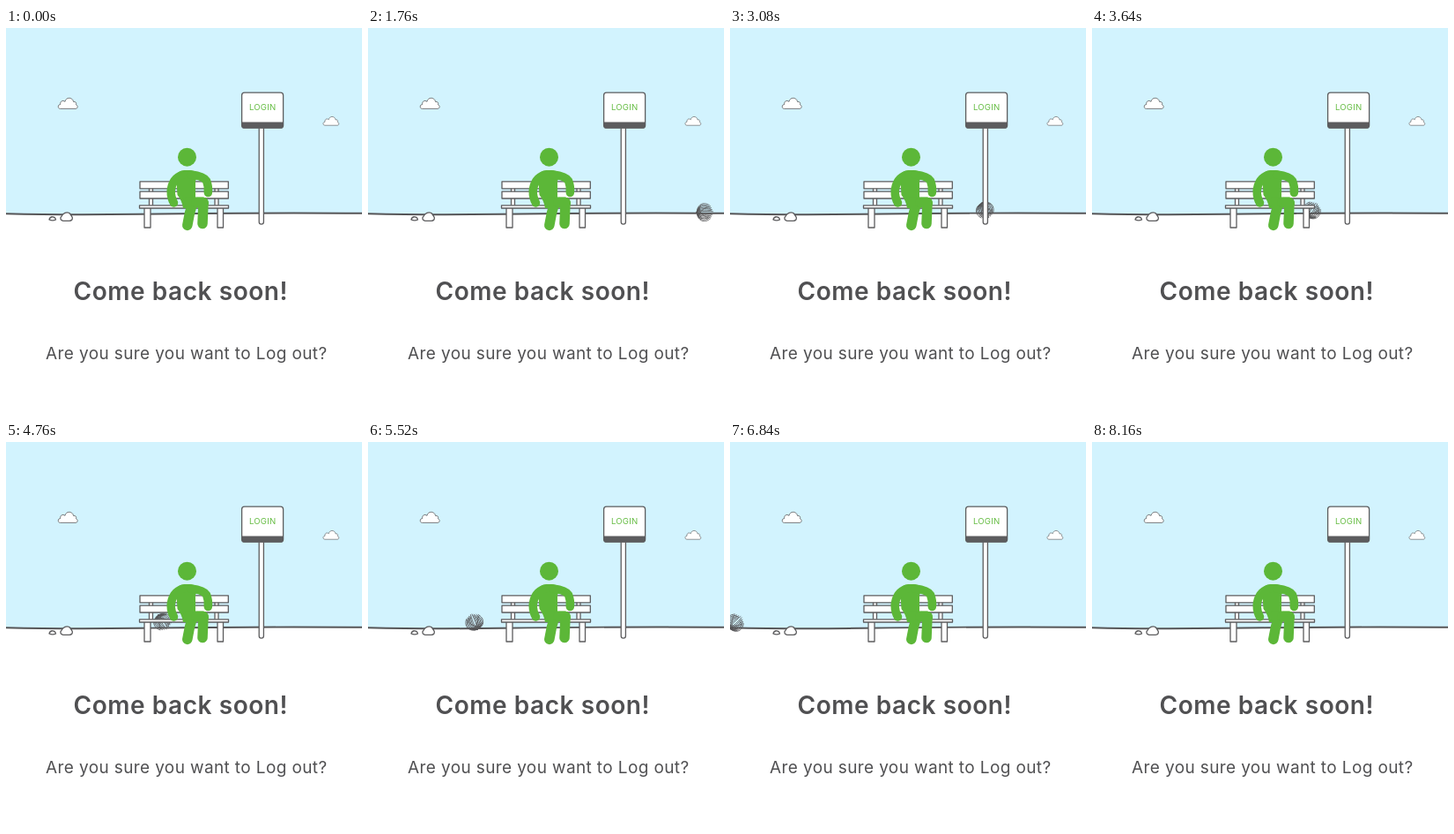
Write an HTML page that moves like this. It is 404x437 px and loops after 9000 ms.

```html
<!DOCTYPE html>
<html lang="en">
<head>
<meta charset="utf-8">
<title>Come back soon!</title>
<style>
  html, body { margin: 0; width: 100%; height: 100%; overflow: hidden; background: #fff; }
  svg { display: block; width: 404px; height: 437px; }
  text { font-family: Inter, sans-serif; text-anchor: middle; fill: #505052; letter-spacing: .02em; }
  .outline { fill: #fff; stroke: #5c5c5e; stroke-width: 1.3; stroke-linejoin: round; }
  .thin { stroke-width: .8; }
  .limb { fill: none; stroke: #5cb738; stroke-linecap: round; stroke-linejoin: round; }
  #weed { fill: none; stroke: #555557; stroke-width: .8; stroke-linecap: round; }
</style>
</head>
<body>
<svg viewBox="0 0 404 437">
  <path fill="#d2f3fe" d="M0 0H404V210L290 209 100 211 0 210.5Z"/>
  <path fill="none" stroke="#555557" stroke-width="1.9" d="M0 210.2C50 211.5 100 211.5 150 210.8S300 208.8 404 209.8"/>

  <g class="outline thin">
    <path id="cloud" d="M61.5 91.4C58.5 91.4 58.4 86.6 61.8 86.4C61 83 64.6 81.2 67 83.4C67.6 78.2 75.6 77.6 76.6 83.6C79 83 80.4 84.8 79.4 86.8C82 87.6 81.6 91.4 79 91.4Z"/>
    <use href="#cloud" transform="translate(312 36.2) scale(.81)"/>
  </g>

  <g id="weed"></g>

  <g class="outline">
    <path d="M49 217Q50 213.5 53 213.8T56.5 217Q53 218.7 49 217Z"/>
    <path d="M62 214.5Q63.5 212.8 64.5 211Q68 207.8 72 209.5Q74 212 75.3 214.5Q75.8 218 72 218.3H65Q61.5 218 62 214.5Z"/>
    <path d="M287.2 112V219.5a2.6 2.6 0 0 0 5.2 0V112Z"/>
    <rect x="267.6" y="73.2" width="47" height="40" rx="3"/>
  </g>
  <path fill="#5c5c5e" d="M267.6 106.6H314.6V110.5Q314.6 113.5 311.6 113.5H270.6Q267.6 113.5 267.6 110.5Z"/>
  <text x="291.2" y="93.2" font-size="9.6" style="fill:#67bd45">LOGIN</text>

  <g class="outline">
    <path d="M162.5 180h4v22h-4ZM237 180h4v22h-4Z"/>
    <path d="M157 203h7v23h-7ZM240 203h6.5v23H240Z"/>
    <path d="M152 173.8H252.3V181.8H152ZM152 185.2H252.3V193H152ZM151.5 200.8H252.5V204H151.5Z"/>
  </g>

  <circle cx="205.5" cy="146.2" r="10.5" fill="#5cb738"/>
  <path fill="#5cb738" d="M193 167Q196 161 202 161H209Q215 161.4 220 165L215 173V191.5H224Q230.5 193 230 200L214 204H201Q199.5 195 194.5 189Z"/>
  <g class="limb">
    <path stroke-width="9.5" d="M200 166.5Q189 170 187.2 184Q187 192 190.5 198"/>
    <path stroke-width="9.5" d="M210 166Q224 167.5 227.5 173Q230 179 229.3 186.5"/>
    <path stroke-width="11.5" d="M206 197H212Q208 209 205.8 223.4"/>
    <path stroke-width="11.5" d="M216 197.5H224L223 221.5"/>
  </g>

  <text x="198.3" y="307.8" font-size="28" font-weight="600">Come back soon!</text>
  <text x="204.8" y="375" font-size="19">Are you sure you want to Log out?</text>
</svg>
<script>
  const LOOP = 9000;
  const weed = document.getElementById("weed");

  // Tumbleweed: twigs fan out from a dense knot on the left to ragged ends on the right.
  let twigs = "M-5-8Q-11 0-5 8M-7-6Q-10 0-7 6M-6-5Q-8 1-4 7M-8 4Q-4-4 2-6M-8-4Q-4 4 3 6";
  for (let i = 0; i < 7; i++) {
    const end = 8.8 - i * .5 - (i % 2) * 1.5;
    for (const h of [-1.2 - i * 1.4, 1.2 + i * 1.4])
      twigs += `M-9.5 0C-9 ${h * 1.1} 0 ${h * 1.3} ${end} ${h * .75}`;
  }
  weed.innerHTML = `<path d="${twigs}"/>`;

  // [time, x, y] along the ground
  const route = [
    [1320, 415, 208.5], [1760, 382.7, 208.7], [2560, 326.5, 207.7], [3640, 250, 206],
    [4760, 178, 204], [5520, 120.5, 203.5], [6240, 61, 205], [7040, -12, 204]
  ];

  function place(t) {
    const next = route.findIndex(stop => stop[0] > t);
    weed.style.display = next > 0 ? "" : "none";
    if (next < 1) return;
    const [t0, x0, y0] = route[next - 1], [t1, x1, y1] = route[next];
    const k = (t - t0) / (t1 - t0);
    const spin = (1760 - t) * .221;
    weed.setAttribute("transform",
      `translate(${x0 + (x1 - x0) * k} ${y0 + (y1 - y0) * k}) rotate(${spin})`);
  }

  function frame() {
    place(performance.now() % LOOP);
    requestAnimationFrame(frame);
  }
  frame();
</script>
</body>
</html>
```
